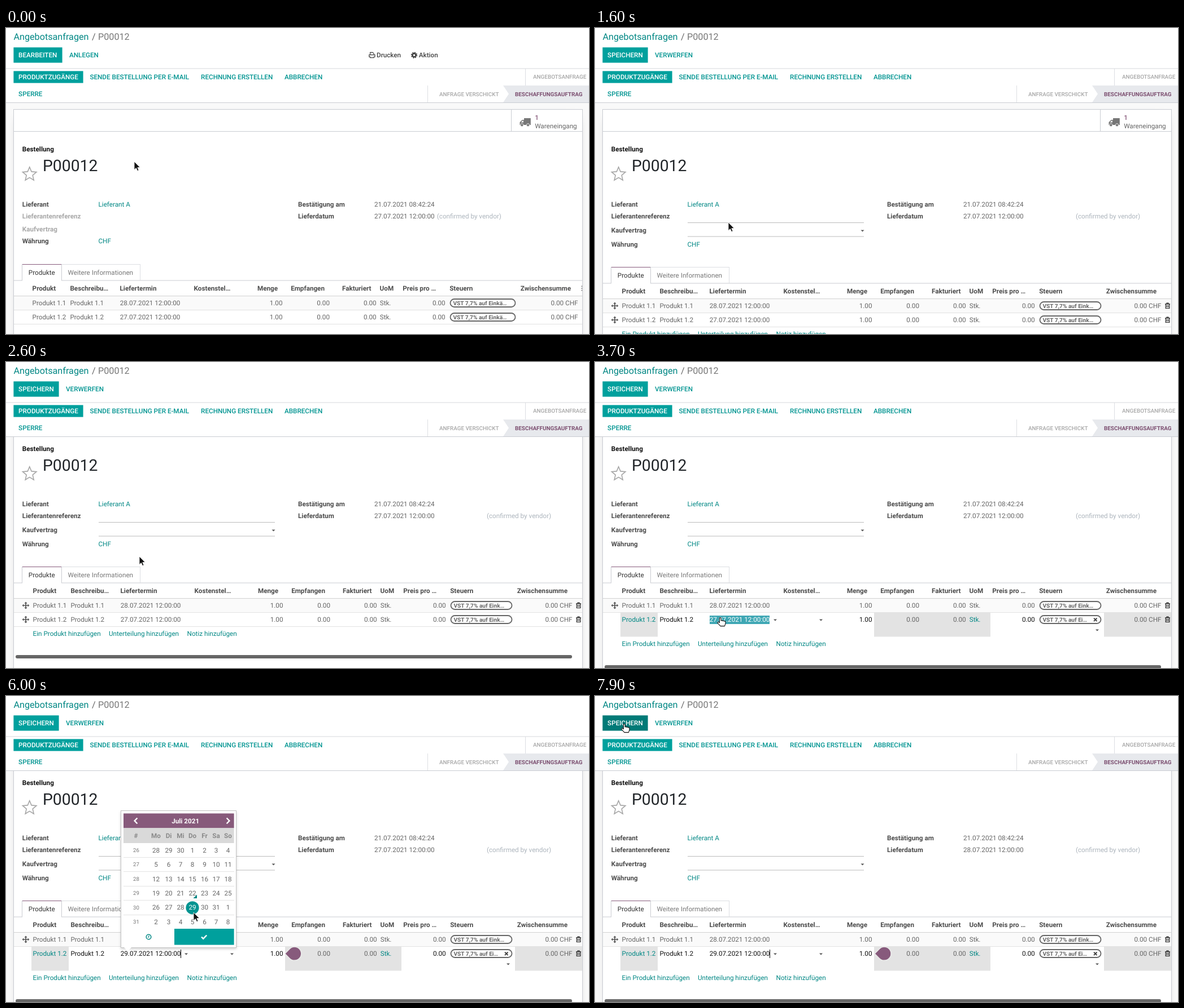
These frames come from a looping animation (1032x543 px, 8000 ms). An HTML page:

```html
<!DOCTYPE html>
<html lang="de">
<head>
<meta charset="utf-8">
<title>Angebotsanfrage P00012</title>
<style>
html, body { margin: 0; width: 100%; height: 100%; overflow: hidden; background: #fff; }
svg { display: block; width: 100%; height: 100%; }
text { font-family: Roboto, sans-serif; text-rendering: geometricPrecision; }
</style>
</head>
<body>
<svg id="stage" viewBox="0 0 1032 543"></svg>
<script>
const LOOP = 8000, STEP = 100;
const TEAL = '#00a09d', DARK = '#007a77', LINK = '#008784', ACTION = '#009491', PURPLE = '#875a7b';
const GREY = '#666', LABEL = '#4c4c4c', MUTED = '#a8a8a8', LINE = '#c9ccd2';

// Drawing helpers; text is placed by the vertical centre of its capitals.
const text = (x, y, s, fill = GREY, weight = 400, anchor = 'start', size = 11.7) =>
  `<text x="${x}" y="${y + size * 0.36}" fill="${fill}" font-weight="${weight}" text-anchor="${anchor}" font-size="${size}">${s}</text>`;
const rect = (x1, y1, x2, y2, fill, extra = '') =>
  `<rect x="${x1}" y="${y1}" width="${x2 - x1}" height="${y2 - y1}" fill="${fill}" ${extra}/>`;
const button = (x1, y1, x2, y2, fill) => rect(x1 + 0.4, y1 + 0.4, x2 - 0.4, y2 - 0.4, fill);
const hLine = (x1, x2, y, c = LINE) => rect(x1, y, x2, y + 1, c);
const vLine = (x, y1, y2, c = LINE) => rect(x, y1, x + 1, y2, c);
const path = (d, fill, extra = '') => `<path d="${d}" fill="${fill}" ${extra}/>`;
const stroke = (c, w) => `stroke="${c}" stroke-width="${w}"`;
const at = (x, y, s) => `<g transform="translate(${x} ${y})">${s}</g>`;
const dropCaret = (x, y) => path(`M${x - 3} ${y - 1.5}h6l-3 3z`, '#555');
const times = (n, f) => Array.from({ length: n }, (_, i) => f(i)).join('');

// Cursor hot spot: time, x, y
const cursorKeys = [
  [0, 227, 237], [100, 227, 237], [800, 52, 46], [1200, 52, 46], [1600, 236, 345],
  [2700, 236, 345], [2800, 228, 372], [3100, 266, 456], [3500, 266, 456], [3600, 221, 454],
  [4900, 221, 454], [5700, 332, 384], [6000, 332, 384], [6300, 348, 424], [6500, 348, 424],
  [6900, 190, 275], [7100, 164, 208], [7600, 56, 92], [7700, 52, 60], [7900, 51, 50], [8000, 51, 50]
];
const handTimes = [[700, 1200], [2800, 2800], [3000, 5000], [6200, 6500], [6900, 7100], [7600, 7900]];
const within = (t, a, b) => t >= a && t < b;

function cursorAt(t) {
  const i = cursorKeys.findIndex((k, n) => t <= cursorKeys[n + 1][0]);
  const [t0, x0, y0] = cursorKeys[i], [t1, x1, y1] = cursorKeys[i + 1];
  const p = (t - t0) / (t1 - t0), ease = p * p * (3 - 2 * p);
  return { x: x0 + (x1 - x0) * ease, y: y0 + (y1 - y0) * ease };
}

function stateAt(t) {
  const scroll = t < 2200 ? 0 : t < 2300 ? 18 : t < 2400 ? 44 : t < 2600 ? 60 : 61;
  return {
    t, scroll,
    edit: t >= 1200,
    rowEdit: t >= 3600,
    selected: within(t, 3700, 5700),
    calendar: within(t, 4500, 6500),
    picked: t >= 5700,
    focused: t < 6500 || t >= 7300,
    delivery: t >= 7300 ? '28' : '27',
    hand: handTimes.some(([a, b]) => t >= a && t <= b),
    buttonHover: within(t, 700, 1300) || t >= 7700,
    supplierHover: within(t, 6900, 7200),
    tabHover: t === 2800,
    cursor: cursorAt(t)
  };
}

function cursor({ cursor: { x, y }, hand }) {
  return hand
    ? at(x - 5, y - 1, path('M4.4 9.6V2a1.3 1.3 0 0 1 2.7 0V6l1.4-.5 1.4.9 1.3-.4 1.3.9 1.3-.2 1.2 1.2V11l-1.5 4.6H6L.9 10c-.6-1.2.8-2 1.9-1.4z', '#fff', stroke('#111', 1.1) + ' stroke-linejoin="round"'))
    : at(x, y, path('M0 0V14.5L3.3 11.4L5.7 16.5L8 15.5L5.8 10.5H10.3Z', '#111', stroke('#fff', 0.8)));
}

function header(s) {
  const save = s.edit;
  const gear = `<circle cx="722.5" cy="48.2" r="3.1" fill="none" ${stroke('#444', 2.6)}/>` +
    `<circle cx="722.5" cy="48.2" r="4.8" fill="none" ${stroke('#444', 1.8)} stroke-dasharray="1.9 1.87"/>`;
  const printer = path('M644.6 47v-3.6h4.6l2 2v1.6M644.6 50.5v2.2h6.6v-2.2M644 51.2h-1.2v-3.6h10.2v3.6H652', 'none', stroke('#444', 1.2));
  return rect(0, 0, 1032, 132, '#fff') +
    text(13.4, 15.2, 'Angebotsanfragen', LINK, 400, 'start', 16.2) +
    text(152, 15.2, '/', GREY, 400, 'start', 16.2) +
    text(163, 15.2, 'P00012', '#777', 400, 'start', 16.2) +
    button(13, 34, save ? 94 : 100, 62, s.buttonHover ? DARK : TEAL) +
    text(22.1, 48, save ? 'SPEICHERN' : 'BEARBEITEN', '#fff', 500) +
    text(save ? 106 : 112, 48, save ? 'VERWERFEN' : 'ANLEGEN', ACTION, 500) +
    (save ? '' : printer + text(656, 48, 'Drucken', '#444', 500) + gear + text(730.8, 48, 'Aktion', '#444', 500)) +
    hLine(0, 1032, 71.5, '#d5d7db') +
    button(13, 76, 137, 98, TEAL) + text(22.1, 87, 'PRODUKTZUGÄNGE', '#fff', 500) +
    [[148.4, 87, 'SENDE BESTELLUNG PER E-MAIL'], [345.1, 87, 'RECHNUNG ERSTELLEN'], [492.9, 87, 'ABBRECHEN'], [22.1, 116.5, 'SPERRE']]
      .map(b => text(...b, ACTION, 500)).join('') +
    vLine(919, 72, 102, '#dcdee2') + text(933, 86.5, 'ANGEBOTSANFRAGE', MUTED, 500, 'start', 9.9) +
    vLine(746, 102, 132, '#dcdee2') + text(767, 117, 'ANFRAGE VERSCHICKT', MUTED, 500, 'start', 9.9) +
    path('M880 102H1032V132H880L890 117Z', '#e7e9ed') +
    text(901, 117, 'BESCHAFFUNGSAUFTRAG', '#7c4f70', 700, 'start', 9.9) +
    hLine(0, 1032, 132, LINE);
}

function form(s) {
  const e = s.edit, labels = e ? [334, 359, 383.5] : [334, 356.5, 378], soft = e ? LABEL : MUTED;
  const star = times(10, i => {
    const r = i % 2 ? 5.8 : 12.8, a = (i * 36 - 90) * Math.PI / 180;
    return `${(41.7 + r * Math.cos(a)).toFixed(1)},${(259.6 + r * Math.sin(a)).toFixed(1)} `;
  });
  const truck = rect(917, 160, 928.8, 172, '#777') + path('M918 163h-4.2l-4.3 4.2V172h8.5z', '#777') +
    path('M915.8 164.5v3h-4.3l3-3z', '#fff') +
    [913.3, 924].map(x => `<circle cx="${x}" cy="172.2" r="2.6" fill="#777" ${stroke('#fff', 0.8)}/>`).join('');
  return rect(14, 145, 1020, 700, '#fff') +
    `<rect x="13.5" y="144.5" width="1007" height="560" fill="none" ${stroke(LINE, 1)}/>` +
    hLine(14, 1020, 183, LINE) + vLine(894, 145, 183, LINE) + truck +
    text(936.2, 159, '1', PURPLE, 500) + text(936.2, 173.3, 'Wareneingang') +
    text(28.8, 214.5, 'Bestellung', '#111', 700) +
    `<polygon points="${star}" fill="none" ${stroke('#a6a6a6', 1.6)}/>` +
    text(65, 244, 'P00012', '#212529', 400, 'start', 28.3) +
    text(28.8, 312.5, 'Lieferant', LABEL, 700) +
    ['Lieferantenreferenz', 'Kaufvertrag'].map((l, i) => text(28.8, labels[i], l, soft, 700)).join('') +
    text(28.8, labels[2], 'Währung', LABEL, 700) +
    text(163.5, 312.5, 'Lieferant A', s.supplierHover ? '#003b3a' : LINK) + text(163.5, labels[2], 'CHF', LINK) +
    (e ? hLine(164, 476, 345, '#bbb') + hLine(164, 476, 369.5, '#bbb') + dropCaret(473.5, 360) : '') +
    text(517, 312.5, 'Bestätigung am', LABEL, 700) + text(517, 334, 'Lieferdatum', LABEL, 700) +
    text(651.9, 312.5, '21.07.2021 08:42:24') + text(651.9, 334, s.delivery + '.07.2021 12:00:00') +
    text(e ? 851 : 762.8, 334, '(confirmed by vendor)', '#adb5bd');
}

function pill(y, label, left, right) {
  return `<rect x="${left}" y="${y - 7}" width="${right - left}" height="14" rx="7" fill="#fff" ${stroke('#666', 1.8)}/>` +
    text(left + 5, y, label, GREY, 700, 'start', 10.15);
}

const moveIcon = y => path(`M30 ${y}H40M35 ${y - 5}V${y + 5}`, 'none', stroke('#555', 1.7)) +
  at(35, y, [0, 90, 180, 270].map(a => `<path d="M-2.6 -3.6L0 -6.4L2.6 -3.6Z" fill="#555" transform="rotate(${a})"/>`).join(''));
const trashIcon = y => path(`M1009 ${y - 3.2}h9M1012 ${y - 3.6}v-1.3h3v1.3M1010.2 ${y - 3}v7.5h6.6v-7.5M1012.3 ${y - 1.2}v4M1014.7 ${y - 1.2}v4`, 'none', stroke('#222', 1.2));

function productRow(s, y, name, date, editing) {
  const d = s.edit ? 1 : 0, ink = editing ? '#111' : GREY, link = editing ? LINK : GREY;
  const label = 'VST 7,7% auf ' + (editing ? 'Ei…' : s.edit ? 'Eink…' : 'Einkä…');
  let out = '';
  if (editing) {
    for (const [a, b] of [[45, 111], [494, 700], [901, 1020]])
      out += s.focused ? rect(a, 501, b, 543.5, '#e3e3e3') : hLine(a, b, 543, '#dcdcdc');
    if (s.selected) out += rect(203, 506, 309, 521, '#3fa7b4');
    if (s.picked && s.focused) out += vLine(309, 506, 521, '#000');
    out += dropCaret(319, y + 1) + dropCaret(400, y + 1) + dropCaret(889, y + 19);
  }
  out += text(46.6 + d, y, name, link) + text(113.4 + d, y, name, ink) +
    text(201.7 + d, y, date + '.07.2021 12:00:00', editing && s.selected ? '#fff' : ink) +
    text(489.5 + d, y, '1.00', ink, 400, 'end') + text(573 + d, y, '0.00', GREY, 400, 'end') +
    text(655.7 + d, y, '0.00', GREY, 400, 'end') + text(661.7 + d, y, 'Stk.', link) +
    text(777.7 + d, y, '0.00', ink, 400, 'end') + pill(y, label, 786.5 + d, s.edit ? 895.5 : 901.5) +
    text(s.edit ? 1002.5 : 1012.5, y, '0.00 CHF', GREY, 400, 'end');
  if (s.edit) out += trashIcon(y) + (editing ? '' : moveIcon(y));
  if (editing) out += path(`M883 ${y - 2.5}l5.5 5.5M888.5 ${y - 2.5}l-5.5 5.5`, 'none', stroke('#444', 1.8));
  return out;
}

function table(s) {
  const d = s.edit ? 1 : 0, grow = s.rowEdit ? 18 : 0;
  const left = [[46.6, 'Produkt'], [113.4, 'Beschreibu…'], [201.5, 'Liefertermin'], [332.6, 'Kostenstel…'], [661.6, 'UoM'], [702.3, 'Preis pro …'], [785.2, 'Steuern']];
  const right = [[481, 'Menge'], [564, 'Empfangen'], [646.5, 'Fakturiert'], [s.edit ? 993 : 1000, 'Zwischensumme']];
  let out = hLine(14, 1020, 447.5, LINE) + rect(29, 419, 98, 449, '#fff') +
    hLine(28, 99, 419, PURPLE) + vLine(28, 419, 448) + vLine(98, 419, 448) +
    hLine(99, 238, 419, '#dcdee2') + vLine(237, 419, 448, '#dcdee2') +
    text(39.8, 434, 'Produkte', '#333') + text(109.5, 434, 'Weitere Informationen', s.tabHover ? '#333' : '#777') +
    rect(14, 475, 1020, 500, '#fafafa') +
    hLine(14, 1020, 475, '#d2d2d2') + hLine(14, 1020, 500, '#e2e2e2') +
    (s.rowEdit ? '' : hLine(14, 1020, 525, '#e2e2e2')) +
    left.map(([x, l]) => text(x + d, 462, l, LABEL, 700)).join('') +
    right.map(([x, l]) => text(x + d, 462, l, LABEL, 700, 'end')).join('') +
    (s.edit ? '' : times(3, i => rect(1018.5, 457.5 + i * 3.6, 1020, 459.2 + i * 3.6, '#777'))) +
    productRow(s, 488, 'Produkt 1.1', '28', false) +
    productRow(s, 513, 'Produkt 1.2', s.picked ? '29' : '27', s.rowEdit);
  if (s.edit) out += [[47.6, 'Ein Produkt hinzufügen'], [182, 'Unterteilung hinzufügen'], [320.6, 'Notiz hinzufügen']]
    .map(([x, l]) => text(x, 537.5 + grow, l, LINK)).join('') +
    rect(17, 576 + grow, 1002, 582 + grow, '#666', 'rx="3"');
  return at(0, s.edit ? 5 : 0, out);
}

function calendar(s) {
  const columns = [265.5, 288, 309, 330, 351.5, 372, 393];
  const dayX = s.picked ? columns[3] : columns[1];
  const chevron = (x, w) => path(`M${x - w} 216.5l${2 * w} 5l${-2 * w} 5`, 'none', stroke('#fff', 2.4));
  let out = rect(203.5, 203.5, 407.5, 446.5, '#fff', stroke('#c4c4c4', 1) + ' filter="url(#shade)"') +
    path('M209 446L215.5 453L222 446Z', '#fff') +
    rect(208, 208.4, 403.6, 234.4, PURPLE) + chevron(230, -2.4) + chevron(393, 2.4) +
    text(317.7, 221.5, 'Juli 2021', '#fff', 700, 'middle') +
    rect(208, 234.4, 403.6, 261, '#d9d9d9') + text(230, 248, '#', '#8a8a8a', 700, 'middle') +
    ['Mo', 'Di', 'Mi', 'Do', 'Fr', 'Sa', 'So'].map((n, i) => text(columns[i], 248, n, '#8a8a8a', 700, 'middle')).join('');
  for (let week = 0; week < 6; week++) {
    const y = 273.6 + week * 25.4;
    out += text(230.5, y, 26 + week, '#777', 400, 'middle', 9.6);
    if (week < 5) out += hLine(208, 404, Math.round(y + 12.4), '#e4e4e4');
    columns.forEach((x, i) => {
      const n = week * 7 + i, day = n < 3 ? 28 + n : (n - 3) % 31 + 1;
      out += text(x, y, day, GREY, 400, 'middle');
    });
  }
  // The active day covers its plain number and the divider lines.
  return out + `<circle cx="${dayX}" cy="375.8" r="11.6" fill="${ACTION}"/>` +
    text(dayX, 375.2, s.picked ? 29 : 27, '#fff', 400, 'middle') +
    path('M338 352.5V359H331.5Z', LINK) +
    `<circle cx="252.5" cy="427.5" r="4.3" fill="none" ${stroke(LINK, 1.5)}/>` +
    path('M252.8 425v3h-2.2', 'none', stroke(LINK, 1.1)) +
    button(297.6, 412.6, 404, 442, within(s.t, 6200, 6500) ? DARK : TEAL) +
    path('M346 427.5l3.2 3.2l6-6.2', 'none', stroke('#fff', 2.4));
}

const hint = t => at(510.5 - 2.3 * Math.sin(2 * Math.PI * t / 1000), 457.2,
  path('M-15.9 0L-8 -8A11.4 11.4 0 1 1 -8 8Z', PURPLE, 'filter="url(#glow)"'));

function render(t) {
  const s = stateAt(t);
  return `<defs>
    <filter id="blur" x="-10%" y="-20%" width="120%" height="140%"><feGaussianBlur stdDeviation="9"/></filter>
    <filter id="shade"><feDropShadow dx="0" dy="2" stdDeviation="2" flood-opacity=".18"/></filter>
    <filter id="glow" x="-30%" y="-30%" width="160%" height="160%"><feDropShadow dx="0" dy="0" stdDeviation="1.5" flood-color="#fff" flood-opacity=".9"/></filter>
    </defs>` +
    rect(0, 0, 1032, 543, '#f9f9f9') +
    at(0, -s.scroll, rect(27.5, 163, 1006.5, 720, '#000', 'filter="url(#blur)"') + form(s) + table(s)) +
    header(s) + (s.calendar ? calendar(s) : '') + (s.picked ? hint(t) : '') + cursor(s);
}

const stage = document.getElementById('stage');
let shown = -1;
function tick() {
  const t = Math.floor(performance.now() % LOOP / STEP) * STEP;
  if (t !== shown) stage.innerHTML = render(shown = t);
  requestAnimationFrame(tick);
}
tick();
</script>
</body>
</html>
```
